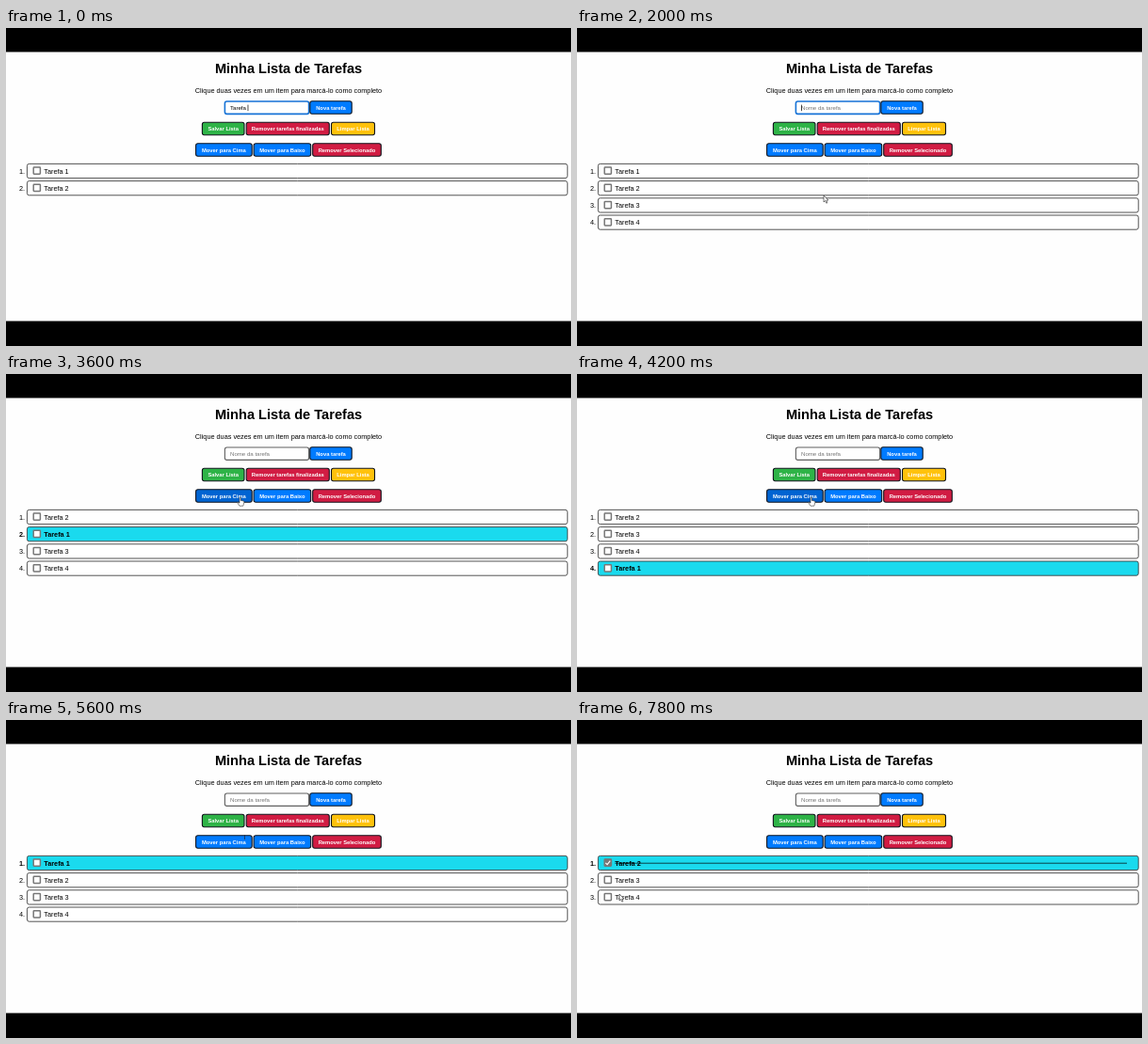
Recreate the animation shown at these times as an HTML page with a canvas. Size 600x338 px, loop 8 s.

```html
<!DOCTYPE html>
<html lang="pt">
<head>
<meta charset="utf-8">
<title>Minha Lista de Tarefas</title>
<style>
  html, body { margin: 0; width: 100%; height: 100%; overflow: hidden; background: #000; }
  canvas { display: block; width: 600px; height: 338px; }
</style>
</head>
<body>
<canvas id="stage"></canvas>
<script>
const W = 600, H = 338, LOOP = 8000, STEP = 200;
const canvas = document.getElementById('stage');
const scale = window.devicePixelRatio || 1;
canvas.width = W * scale;
canvas.height = H * scale;
const ctx = canvas.getContext('2d');
ctx.scale(scale, scale);

const FONT = '"Liberation Sans", Arial, sans-serif';
const BLUE = '#007bff', BLUE_HOVER = '#0064d2', RED = '#d11c43';
const GREEN = '#2eb347', YELLOW = '#ffc20c', CYAN = '#1adaee';

// label, x, y, width, fill
const BUTTONS = [
  ['Nova tarefa', 322.8, 77.8, 44.4, BLUE],
  ['Salvar Lista', 208.4, 100.3, 44.6, GREEN],
  ['Remover tarefas finalizadas', 255.2, 100.3, 88.1, RED],
  ['Limpar Lista', 345.5, 100.3, 46, YELLOW],
  ['Mover para Cima', 201.6, 122.8, 59.6, BLUE],
  ['Mover para Baixo', 263.1, 122.8, 60.6, BLUE],
  ['Remover Selecionado', 325.7, 122.8, 72.6, RED]
];

// Each entry changes part of the page from its time on.
const EVENTS = [
  [0, { items: '12', input: 'Tarefa ', focus: true, selected: '', done: '', cursor: null, hover: '' }],
  [200, { input: 'Tarefa 3' }],
  [400, { items: '123', input: '' }],
  [800, { input: 'Tarefa' }],
  [1000, { input: 'Tarefa 4' }],
  [1400, { items: '1234', input: '' }],
  [2000, { cursor: ['arrow', 262, 178] }],
  [2200, { cursor: ['arrow', 228, 156] }],
  [2400, { cursor: ['arrow', 216, 148], selected: '1', focus: false }],
  [2800, { cursor: ['hand', 284, 131], hover: 'Mover para Baixo' }],
  [3000, { items: '2134' }],
  [3200, { items: '2314' }],
  [3400, { cursor: ['hand', 248, 131], hover: 'Mover para Cima' }],
  [3600, { items: '2134' }],
  [4000, { items: '1234' }],
  [4200, { items: '2341' }],
  [4400, { items: '2314' }],
  [4600, { items: '2134' }],
  [4800, { items: '1234' }],
  [5600, { cursor: ['bar', 253, 122], hover: '' }],
  [5800, { cursor: ['arrow', 318, 117] }],
  [6000, { cursor: ['hand', 352, 130] }],
  [6200, { items: '234', selected: '' }],
  [6400, { cursor: ['arrow', 290, 141] }],
  [6600, { cursor: ['arrow', 190, 149] }],
  [6800, { cursor: ['arrow', 110, 150] }],
  [7000, { selected: '2' }],
  [7200, { done: '2' }],
  [7400, { cursor: ['arrow', 88, 158] }],
  [7600, { cursor: ['arrow', 62, 174] }],
  [7800, { cursor: ['arrow', 45, 185] }]
];

function stateAt(time) {
  const state = {};
  for (const [start, change] of EVENTS) {
    if (start <= time) Object.assign(state, change);
  }
  return state;
}

function text(str, x, y, size, { bold = false, color = '#000', align = 'left' } = {}) {
  ctx.font = `${bold ? 'bold ' : ''}${size}px ${FONT}`;
  ctx.textAlign = align;
  ctx.fillStyle = color;
  ctx.fillText(str, x, y);
  return ctx.measureText(str).width;
}

function box(x, y, w, h, radius, fill, stroke, line) {
  ctx.beginPath();
  ctx.roundRect(x, y, w, h, radius);
  ctx.fillStyle = fill;
  ctx.fill();
  ctx.strokeStyle = stroke;
  ctx.lineWidth = line;
  ctx.stroke();
}

function rect(x, y, w, h, fill) {
  ctx.fillStyle = fill;
  ctx.fillRect(x, y, w, h);
}

function polyline(points, line, stroke, fill) {
  ctx.beginPath();
  points.forEach(([x, y]) => ctx.lineTo(x, y));
  if (fill) {
    ctx.closePath();
    ctx.fillStyle = fill;
    ctx.fill();
  }
  ctx.lineWidth = line;
  ctx.strokeStyle = stroke;
  ctx.stroke();
}

function drawInput({ input, focus }) {
  box(232.4, 78, 89.2, 13.4, 2.2, '#fff', focus ? '#1672d6' : '#606060', focus ? 1.6 : 1.1);
  let width = 0;
  if (input) width = text(input, 238, 87, 6.1);
  else text('Nome da tarefa', 238, 87, 6.1, { color: '#757575' });
  if (focus) rect(238 + width, 81.6, 0.7, 6.6, '#000');
}

function drawButton([label, x, y, w, fill], hover) {
  box(x, y, w, 13.4, 2.2, label === hover ? BLUE_HOVER : fill, '#10141c', 1.1);
  text(label, x + w / 2, y + 8.8, 5.82, { bold: true, color: '#fff', align: 'center' });
}

function drawItem(id, index, state) {
  const y = 144.4 + index * 18.2;
  const bold = id === state.selected;
  const done = id === state.done;
  text(`${index + 1}.`, 14, y + 10.3, 7.3, { bold });
  box(22.4, y, 573.8, 15.2, 2.2, bold ? CYAN : '#fff', '#404040', 0.9);
  box(29.2, y + 3.7, 7.2, 7.2, 0.7, done ? '#777' : '#fff', '#777', 1.5);
  if (done) {
    polyline([[30.3, y + 7.4], [32.1, y + 9.2], [35.3, y + 5.2]], 1.1, '#fff');
  }
  text(`Tarefa ${id}`, 40.3, y + 10.3, 7.3, { bold });
  if (done) rect(40.3, y + 7.4, 543.7, 0.7, '#000');
}

function drawCursor([kind, x, y]) {
  ctx.save();
  ctx.translate(x, y);
  if (kind === 'bar') {
    rect(0, 0, 0.8, 5, '#1c2c48');
  } else if (kind === 'arrow') {
    polyline([[0, 0], [0, 7], [1.6, 5.6], [2.8, 8.2], [3.9, 7.7], [2.8, 5.1], [4.9, 5]],
      0.6, '#222', '#fff');
  } else {
    polyline([[0, 0], [1.2, 0], [1.3, 3.4], [4.4, 4], [5, 5], [4.4, 7.3], [3.8, 9.2],
      [0, 9.2], [-2.2, 6], [-1.6, 5.2], [0, 6.2]], 0.6, '#333', '#fff');
  }
  ctx.restore();
}

function draw(time) {
  const state = stateAt(time);
  rect(0, 0, W, H, '#000');
  rect(0, 25.5, W, 286, '#fefefe');
  text('Minha Lista de Tarefas', 300, 48.2, 14.6, { bold: true, align: 'center' });
  text('Clique duas vezes em um item para marcá-lo como completo', 300, 68.5, 7.3,
    { align: 'center' });
  drawInput(state);
  BUTTONS.forEach(button => drawButton(button, state.hover));
  [...state.items].forEach((id, index) => drawItem(id, index, state));
  if (state.cursor) drawCursor(state.cursor);
}

const origin = performance.now();
function tick() {
  const time = (performance.now() - origin) % LOOP;
  draw(Math.floor(time / STEP) * STEP);
  requestAnimationFrame(tick);
}
tick();
</script>
</body>
</html>
```
